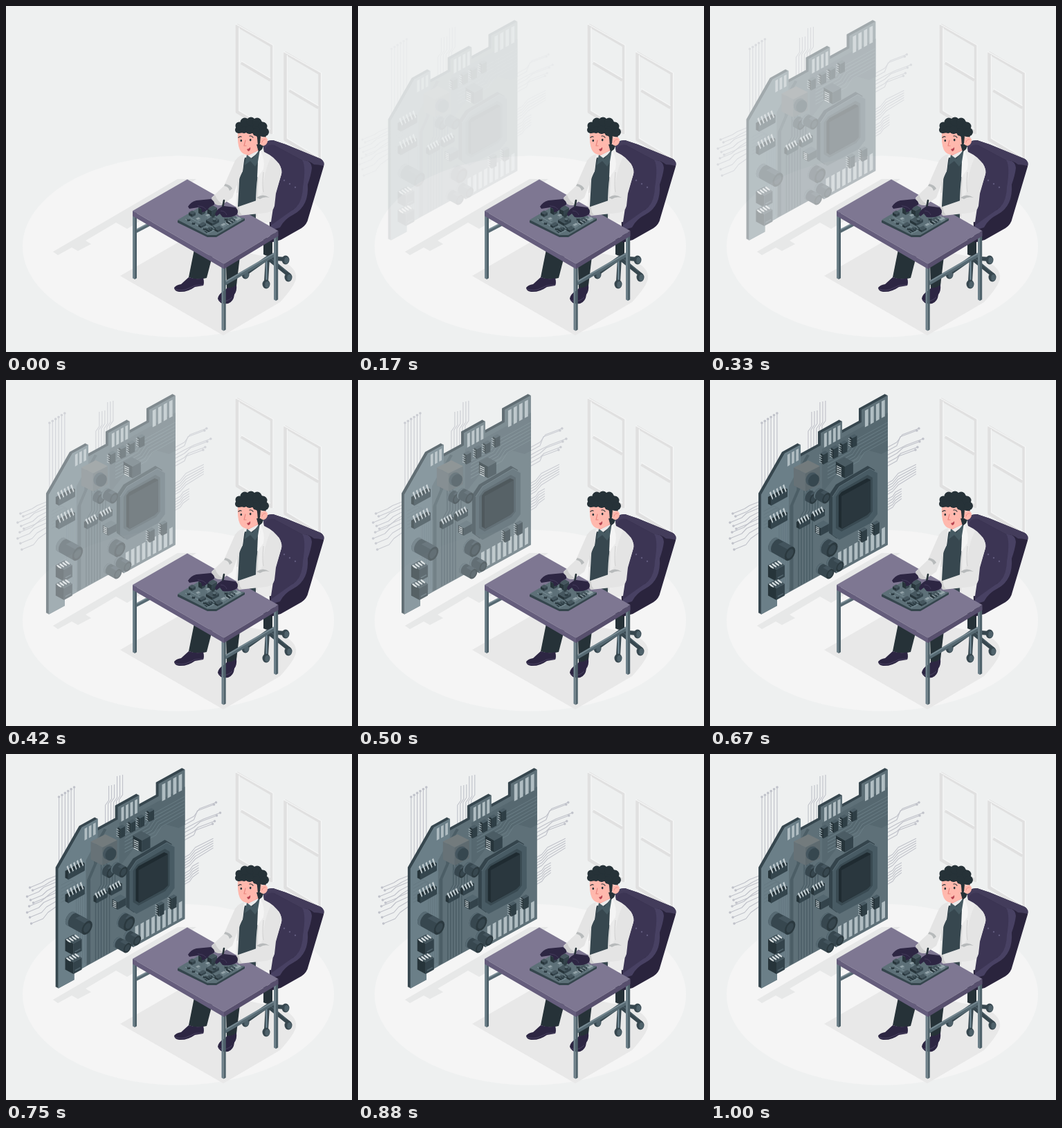
Recreate the animation shown at these times as an HTML page. Size 500 px wide and 500 px high, loop 1.04 s.

```html
<!DOCTYPE html>
<html lang="en">
<head>
<meta charset="utf-8">
<title>Circuit board workshop</title>
<style>
html, body { margin: 0; width: 100%; height: 100%; overflow: hidden; background: #eef0f0; }
svg { display: block; width: 100vw; height: 100vh; }
</style>
</head>
<body>
<svg id="stage" viewBox="0 0 500 500"></svg>
<script>
const NS = 'http://www.w3.org/2000/svg';
const stage = document.getElementById('stage');

function add(parent, tag, attrs = {}) {
  const node = document.createElementNS(NS, tag);
  for (const key in attrs) node.setAttribute(key, attrs[key]);
  parent.appendChild(node);
  return node;
}
const layer = (parent, transform) => add(parent, 'g', transform ? { transform } : {});
const shape = (g, d, fill) => add(g, 'path', { d, fill });
const line = (g, d, stroke, width = 1, cap = 'butt') =>
  add(g, 'path', { d, stroke, 'stroke-width': width, 'stroke-linecap': cap, 'stroke-linejoin': 'round', fill: 'none' });
const dot = (g, cx, cy, r, fill) => add(g, 'circle', { cx, cy, r, fill });

// Upright box: (x, y) is its lowest corner, a runs left, b runs right, h is its height.
function box(g, x, y, a, b, h, [top, left, right], k = .55) {
  shape(g, `M${x} ${y}l${-a} ${-a * k}v${-h}l${a} ${a * k}z`, left);
  shape(g, `M${x} ${y}l${b} ${-b * k}v${-h}l${-b} ${b * k}z`, right);
  shape(g, `M${x} ${y - h}l${-a} ${-a * k}l${b} ${-b * k}l${a} ${a * k}z`, top);
}

// Cylinder standing out of the wall board.
function can(g, x, y, r, len) {
  const c = layer(g, `translate(${x} ${y}) rotate(29)`);
  const e = r * .58;
  shape(c, `M0 ${-r}A${e} ${r} 0 0 0 0 ${r}H${len}V${-r}Z`, '#37474f');
  shape(c, `M0 ${-r}A${e} ${r} 0 0 0 0 ${r}h${len * .16}A${e} ${r} 0 0 1 ${len * .16} ${-r}z`, '#586b74');
  shape(c, `M${len * .4} ${-r}H${len}V${-r * .35}H${len * .2}z`, '#43545d');
  add(c, 'ellipse', { cx: len, cy: 0, rx: e, ry: r, fill: '#2b393f' });
  add(c, 'ellipse', { cx: len, cy: 0, rx: e * .65, ry: r * .68, fill: '#37474f' });
}

// Chip with a row of pale pins along its upper edge.
function pinChip(g, x, y, w, h, pins, rise) {
  shape(g, `M${x - 4} ${y - 3}l${w} ${-w * .55}l4 2v${h}l${-w} ${w * .55}l-4 -2z`, '#26343a');
  shape(g, `M${x} ${y}l${w} ${-w * .55}v${h}l${-w} ${w * .55}z`, '#34454d');
  const step = w / pins;
  for (let i = 0; i < pins; i++) {
    const px = x + step * (i + .4), py = y - step * (i + .4) * .55;
    shape(g, `M${px - 4} ${py - rise + 2}l2 -2l${step * .5 + 1} ${rise}l-1 2z`, '#c3ced2');
  }
}

// Small upright chip with pins on its left side.
function sideChip(g, x, y, w, h) {
  box(g, x, y, 4, w, h, ['#4b5d66', '#26343a', '#2e3e45']);
  for (let v = 2; v < h; v += 3.2) line(g, `M${x - 6} ${y - v - 2}l4 2`, '#b4c1c6', 1);
}

function socket(g, x, y) {
  box(g, x, y, 12, 12, 17, ['#43545c', '#26343a', '#33434b']);
  for (let i = 0; i < 4; i++)
    shape(g, `M${x - 8 + i * 4} ${y - 20 - i * 2}l-3 -3l2 -1l5 4v2z`, '#d8dfe1');
  line(g, `M${x + 2} ${y - 5}l8 -4.4`, '#53666f', 1.5);
}

function room(g) {
  add(g, 'rect', { width: 500, height: 500, fill: '#eef0f0' });
  add(g, 'ellipse', { cx: 249, cy: 347.5, rx: 225, ry: 131, fill: '#f5f5f5' });
  for (const [x, y] of [[332, 26], [401.5, 66]]) {
    const w = layer(g, `translate(${x} ${y})`);
    line(w, 'M2 2L52 31.5V157L2 127Z', '#e0e0e0', 4.5);
    line(w, 'M0 0L54 30.5V159', '#f6f7f7', 1.3);
    line(w, 'M5 5V125L50 152', '#f5f6f6', 1.2);
    line(w, 'M8 56L50 81', '#e0e0e0', 4.5);
    line(w, 'M8 53.4L50 78.2', '#f6f7f7', 1.2);
  }
  shape(g, 'M68 355L248 250H275L190 313L175 322L159 313L115 339L123 344L104 354L95 349L75 360Z', '#e7e8e8');
  shape(g, 'M165 390L255 338L395 366Q421 378 419 394Q417 405 396 428L314 476Z', '#e8e8e8');
}

function wires(g) {
  const tone = '#bfc1c9';
  const wire = (d, x, y) => { line(g, d, tone, 1.1); dot(g, x, y, 1.8, tone); };
  for (let i = 0; i < 6; i++) {
    const x = 75 + i * 4.4, y = 62 - i * 2.8;
    wire(`M${x} ${y}V${170 - i * 8}`, x, y);
  }
  for (let i = 0; i < 3; i++) {
    const x = 142 + i * 4, y = 74 - i * 2;
    line(g, `M${x} 108V${y}l5 -7V${46 - i}`, tone, 1.1);
    line(g, `M${x + 12} 100V${y - 4}l5 -7V${32 - i}`, tone, 1.1);
  }
  for (const [x, y, y0] of [[302, 70, 97], [299, 73, 102], [308, 85, 108], [303, 89, 113], [300, 97, 119], [297, 101, 124]])
    wire(`M250 ${y0 + 4}L270 ${y0 - 7}L${x - 24} ${y + 9}L${x} ${y}`, x, y);
  for (let i = 0; i < 5; i++) {
    line(g, `M250 ${153 + i * 4}L264 ${145 + i * 4}l8 ${-10 + i * .2}L298 ${122 + i * 3.4}`, tone, 1.1);
    line(g, `M250 ${176 + i * 4}L264 ${168 + i * 4}l4 -6L277 ${157 + i * 3.6}`, tone, 1.1);
  }
  for (const [x, y, y1] of [[33, 193, 174], [37, 197, 178], [29, 206, 183], [34, 211, 188], [38, 215, 193], [32, 220, 198], [29, 229, 204], [33, 236, 210], [35, 245, 217]])
    wire(`M${x} ${y}L${x + 17} ${y - 7}L${x + 24} ${(y + y1) / 2 - 2}L76 ${y1}`, x, y);
}

function panel(g) {
  const outline = 'M4 168L38 127H61V144H90V126H121V143H149V125H187V341H112V331H27V341H4Z';
  for (let i = 6; i; i--)
    shape(g, outline, '#37474f').setAttribute('transform', `matrix(1 -.55 0 1 ${70 - i * .65} ${-i * .35})`);
  const p = layer(g, 'matrix(1 -.55 0 1 70 0)');
  shape(p, outline, '#5e7078');
  shape(p, 'M4 168L38 127H61V155L44 178V331H27V341H4Z', '#6b7f88');
  shape(p, 'M92 150H187V205H178L160 190H125L92 214Z', '#566870');
  line(p, 'M48 330V208L58 190V165L72 148', '#4c5e66', 5);
  for (let i = 0; i < 6; i++) {
    line(p, `M${58 + i * 4} 330V${235 + i * 2}l8 -10V${190 + i * 4}`, '#4a5c65', 1.4);
    line(p, `M100 ${172 + i * 5}H${130 + i * 3}l8 -8H187`, '#6d8189', .9);
    line(p, `M8 ${194 + i * 5}H${22 + i * 3}l8 8V325`, '#63767f', .7);
  }
  for (const [u, n, step, v, h] of [[42, 3, 6.2, 131, 17], [95, 4, 6.5, 130, 20], [154, 4, 8, 129, 24]])
    for (let i = 0; i < n; i++)
      add(p, 'rect', { x: u + i * step, y: v, width: step * .6, height: h, fill: '#b0bdc2' });
  for (let i = 0; i < 9; i++)
    add(p, 'rect', { x: 115 + i * 7.9, y: 313, width: 4.8, height: 24, fill: '#b0bdc2' });
}

function processor(g) {
  shape(g, 'M172 166L182 151L228 124L238 130V194L228 206L183 229L172 221Z', '#34444c');
  shape(g, 'M177 169L187 154L231 128L242 134V194L232 207L187 231L177 224Z', '#485b64');
  line(g, 'M177 169L187 154L231 128L242 134', '#5c6f78', 1);
  shape(g, 'M182 169L188 160L228 137L235 141V190L229 198L190 219L182 214Z', '#394a52');
  shape(g, 'M186 167L190 162L227 142L232 144V190L227 195L191 215L186 212Z', '#1f2b31');
  shape(g, 'M190 168L232 145V190L227 195L190 215Z', '#2a373e');
}

function wallBoard(g) {
  wires(g);
  panel(g);
  processor(g);
  for (const [x, y] of [[164, 122], [179, 114], [192, 107], [206, 98]]) sideChip(g, x, y, 6.5, 14);
  for (const [x, y] of [[220, 235], [238, 225]]) sideChip(g, x, y, 7, 16);
  // coil block
  box(g, 138, 161, 17, 21, 26, ['#737b7d', '#677277', '#5e6a6f'], .5);
  add(g, 'ellipse', { cx: 147, cy: 143, rx: 8, ry: 10, fill: '#45565f', transform: 'rotate(29 147 143)' });
  add(g, 'ellipse', { cx: 150, cy: 145, rx: 7.5, ry: 9.5, fill: '#36474f', transform: 'rotate(29 150 145)' });
  // striped blocks
  box(g, 195, 142, 13, 12, 17, ['#4b5c64', '#26343a', '#33434b']);
  for (let i = 0; i < 5; i++) line(g, `M183 ${124 + i * 2.9}l7 3.5`, '#cdd6d9', 1.2);
  box(g, 160, 225, 8, 12, 11, ['#53666f', '#26343a', '#33434b']);
  for (let i = 0; i < 4; i++) line(g, `M153 ${212 + i * 2.6}l5 2.5`, '#cdd6d9', 1.2);
  can(g, 142, 167, 8.5, 9);
  can(g, 156, 164, 8.5, 14);
  pinChip(g, 88, 172, 24, 10, 5, 10);
  pinChip(g, 88, 206, 24, 10, 5, 10);
  pinChip(g, 129, 208, 16, 8, 4, 7);
  pinChip(g, 150, 197, 16, 8, 4, 7);
  can(g, 92, 238, 11, 27);
  can(g, 167, 240, 11.5, 11);
  can(g, 174, 262, 8, 16);
  can(g, 159, 272, 8, 17);
  socket(g, 96, 291);
  socket(g, 96, 318);
}

function chair(g) {
  line(g, 'M378 364L347 386M378 364L376 398M378 364L408 388M378 364L404 366', '#37474f', 6, 'round');
  line(g, 'M376.5 366V396', '#78909c', 2, 'round');
  line(g, 'M377 362L349 382M380 362L405 383', '#4b5d66', 1.5, 'round');
  for (const [x, y] of [[346, 388], [376, 402], [408, 392], [404, 367]]) {
    add(g, 'ellipse', { cx: x, cy: y, rx: 5.5, ry: 6.5, fill: '#37474f' });
    add(g, 'ellipse', { cx: x + 1.5, cy: y + .7, rx: 3.2, ry: 4.6, fill: '#4f626b' });
  }
  shape(g, 'M372 335H385V359Q379 363 372 359Z', '#263238');
  shape(g, 'M372 204Q374 193 386 194L404 200L455 221Q461 225 459 232L437 306Q435 316 427 321L397 338L382 342L378 250Z', '#2a243d');
  shape(g, 'M373 206Q376 199 387 201L428 223Q434 231 432 247L428 275Q424 290 412 296L383 318L376 250Z', '#3c3554');
  shape(g, 'M372 204Q374 193 386 194L404 200L455 221Q461 225 459 231Q451 229 445 229Q437 222 428 223L387 201Q376 199 373 210Z', '#433c5b');
  shape(g, 'M428 223Q441 222 442 234Q441 244 436 258Q438 289 416 301Q402 308 396 320L383 324V317L412 296Q428 288 429 262Q434 232 428 223Z', '#484163');
  for (const [x, y] of [[402, 252], [410, 257], [418, 262]]) dot(g, x, y, 1.2, '#615a7c');
}

function legs(g) {
  shape(g, 'M272 352L298 362L290 393Q276 397 264 392Z', '#263238');
  shape(g, 'M318 374L338 362L333 404Q326 409 319 408Z', '#263238');
  shape(g, 'M243 407Q246 403 253 402L264 392Q277 396 285 393Q287 400 285 404L273 406Q262 414 250 413Q243 412 243 407Z', '#2d2643');
  line(g, 'M244 409Q254 413 264 408L273 404L285 403', '#4c4564', .9);
  shape(g, 'M306 423Q307 416 316 411L320 407Q327 408 333 403Q334 412 330 417Q329 427 321 430Q309 432 306 423Z', '#2d2643');
  line(g, 'M307 425Q317 430 327 421', '#4c4564', .9);
}

function head(g) {
  const skin = '#ffb8ad', hair = '#263238';
  shape(g, 'M335 181Q334 200 338 208Q342 215 349 215Q359 213 366 205L372 180Q352 172 335 181Z', skin);
  shape(g, 'M362 200L373 200L370 207L365 211Z', hair);
  shape(g, 'M336 184Q347 182 357 184Q362 185 364 193L367 195L367 188L375 190L379 180L370 167L350 163L336 170L332 178Z', hair);
  for (const [x, y, r] of [[336, 179, 5], [337, 173, 5.5], [345, 168, 6.5], [354, 167, 6.5], [363, 168, 6.5], [371, 174, 6.5], [374, 182, 6], [344, 179, 5], [352, 179, 6], [362, 182, 6]])
    dot(g, x, y, r, hair);
  add(g, 'ellipse', { cx: 372.5, cy: 195.5, rx: 5.4, ry: 6.6, fill: skin, transform: 'rotate(22 372.5 195.5)' });
  shape(g, 'M363 190L368 188L367 199L364 203Z', hair);
  line(g, 'M370 197Q371 192 375 193', '#ee8f89', 1, 'round');
  add(g, 'ellipse', { cx: 339.8, cy: 194.5, rx: 1.3, ry: 1.8, fill: hair });
  add(g, 'ellipse', { cx: 353.2, cy: 193.6, rx: 1.3, ry: 1.8, fill: hair });
  line(g, 'M336 190Q338 188 340 189M352 188Q355 187 357 190', hair, 1.2, 'round');
  line(g, 'M346 194L344 202L347 202', '#e8837d', 1.1, 'round');
  shape(g, 'M348 207Q351 207 353 204Q354 209 350 210Z', '#b64350');
}

function torso(g) {
  const collar = '#465a62', lapel = '#f4f4f4';
  shape(g, 'M349 207L367 198V216L353 222L348 217Z', '#f4a09a');
  shape(g, 'M344 215L348 217L366 208Q383 214 391 224Q399 231 398 243L389 272L383 312L350 316L331 298L335 248Z', '#ebebeb');
  shape(g, 'M345 219L354 220L367 210L366 232Q360 260 361 308L334 306L338 237Z', '#37474f');
  shape(g, 'M348 215L356 221L366 208L369 218L360 232L353 224L345 230Z', collar);
  shape(g, 'M367 207Q375 222 372 236L363 248L364 225Z', lapel);
  shape(g, 'M345 216L342 239L336 249L334 230Z', lapel);
  line(g, 'M364 248L362 304M336 249L334 270', '#cfcfcf', 1);
}

function arms(g) {
  const coat = '#e4e4e4', fold = '#cfcfcf', crease = '#b7babb';
  shape(g, 'M344 214Q333 217 329 228L315 260L297 277Q302 289 311 288L327 277L337 250L342 238Z', coat);
  shape(g, 'M302 273L297 278Q301 288 308 288L313 286Q306 283 302 273Z', fold);
  shape(g, 'M317 257Q325 259 327 264L323 267Q322 261 315 260Z', crease);
  shape(g, 'M383 218Q399 229 398.5 241L390 271L388 289Q386 298 375 299L337 303Q332 299 333 291L362 281L371 269Q372 240 383 218Z', coat);
  shape(g, 'M362 277Q371 270 381 277Q373 275 367 279Z', crease);
  line(g, 'M372 240Q370 260 372 269', fold, 1);
  shape(g, 'M337 290L333 291Q332 299 337 303L341 302Q336 297 337 290Z', fold);
}

function desk(g) {
  const steel = ['#8da0a8', '#6d8089', '#4f626b'];
  line(g, 'M187 326L210 314', '#566972', 5);
  line(g, 'M187 324L210 312', '#7d9098', 1.5);
  line(g, 'M316 401L390 358', '#566972', 5.5);
  line(g, 'M316 399L390 356', '#788b94', 2);
  box(g, 186, 395, 3, 3, 96, steel);
  box(g, 314.5, 469.5, 3, 3.2, 94, steel);
  box(g, 390, 426, 3, 3.2, 96, steel);
  shape(g, 'M183 296L262 250.5L393.5 325L315 372.5Z', '#7e7792');
  shape(g, 'M183 296L315 372.5V380L183 303.5Z', '#655d7c');
  shape(g, 'M315 372.5L393.5 325V332.5L315 380Z', '#574f6d');
}

function workpiece(g) {
  const dark = ['#46575f', '#27353b', '#34444c'];
  const pale = ['#93a3a9', '#61747c', '#6d8088'];
  shape(g, 'M248 310L279 292L345 307V310L304 334H291L248 313Z', '#35454d');
  shape(g, 'M248 309L279 291L345 307L304 331H291Z', '#5d7078');
  line(g, 'M259 308L292 325M264 305L299 324M290 329L340 307', '#7b9098', 1);
  for (const [x, y, a, b, h] of [[269, 305, 5, 5, 4], [283, 302, 5, 5, 8], [297, 304, 6, 8, 8], [298, 318, 9, 10, 4], [282, 321, 4, 7, 3], [323, 316, 5, 8, 4], [306, 327, 5, 7, 3], [293, 327, 4, 5, 3]])
    box(g, x, y, a, b, h, dark);
  for (const [x, y, a, b, h] of [[277, 312, 3, 4, 3], [313, 321, 3, 5, 3], [334, 313, 3, 6, 3], [291, 308, 3, 4, 4]])
    box(g, x, y, a, b, h, pale);
  for (const [x, y] of [[264, 311], [271, 316], [301, 312], [287, 324], [318, 310]]) {
    line(g, `M${x} ${y}v-4`, '#2d3c43', 4.5);
    add(g, 'ellipse', { cx: x, cy: y - 4, rx: 2.3, ry: 1.4, fill: '#5f727a' });
  }
  for (let i = 0; i < 5; i++) {
    line(g, `M${322 + i * 4} ${316 - i * 2.2}l-5 -3`, '#9aa9af', 1.1);
    line(g, `M${287 + i * 3} ${325 - i * 1.6}l4 3`, '#293940', 1.2);
  }
}

function hands(g) {
  const glove = '#2d2643';
  shape(g, 'M263 290Q267 283 275 281L296 279Q302 282 301 287L294 291Q289 298 283 298Q284 293 278 291L265 293Z', glove);
  line(g, 'M277 289Q285 289 289 294', '#443c5c', 1);
  line(g, 'M315 281L313 292', '#263238', 2.6, 'round');
  line(g, 'M312 292L299 304', '#2f3e45', 3.5, 'round');
  shape(g, 'M302 301Q305 292 315 289L331 291Q337 294 334 301Q325 307 313 305L309 300L304 304Z', glove);
  line(g, 'M310 296Q317 296 319 302', '#443c5c', 1);
}

room(stage);
const board = layer(stage);
wallBoard(board);
const scene = layer(stage);
for (const draw of [chair, legs, torso, head, desk, workpiece, arms, hands]) draw(scene);

const LOOP = 1040, RATE = 24;

// Overshooting ease: cubic-bezier(.36, -.01, .5, 1.38).
function ease(t) {
  if (t <= 0 || t >= 1) return t <= 0 ? 0 : 1;
  const curve = (s, a, b) => 3 * a * s * (1 - s) ** 2 + 3 * b * s * s * (1 - s) + s ** 3;
  let lo = 0, hi = 1;
  for (let i = 0; i < 30; i++) {
    const mid = (lo + hi) / 2;
    if (curve(mid, .36, .5) < t) lo = mid; else hi = mid;
  }
  return curve(lo, -.01, 1.38);
}

function render(now) {
  const step = Math.floor((now % LOOP + 4) * RATE / 1000);
  const k = ease(step ? step / RATE + .01 : 0);
  board.setAttribute('transform', `translate(${(30 * (k - 1)).toFixed(3)} 0)`);
  board.setAttribute('opacity', Math.min(1, Math.max(0, k)).toFixed(4));
}

const start = performance.now();
function tick() {
  render(performance.now() - start);
  requestAnimationFrame(tick);
}
tick();
</script>
</body>
</html>
```
